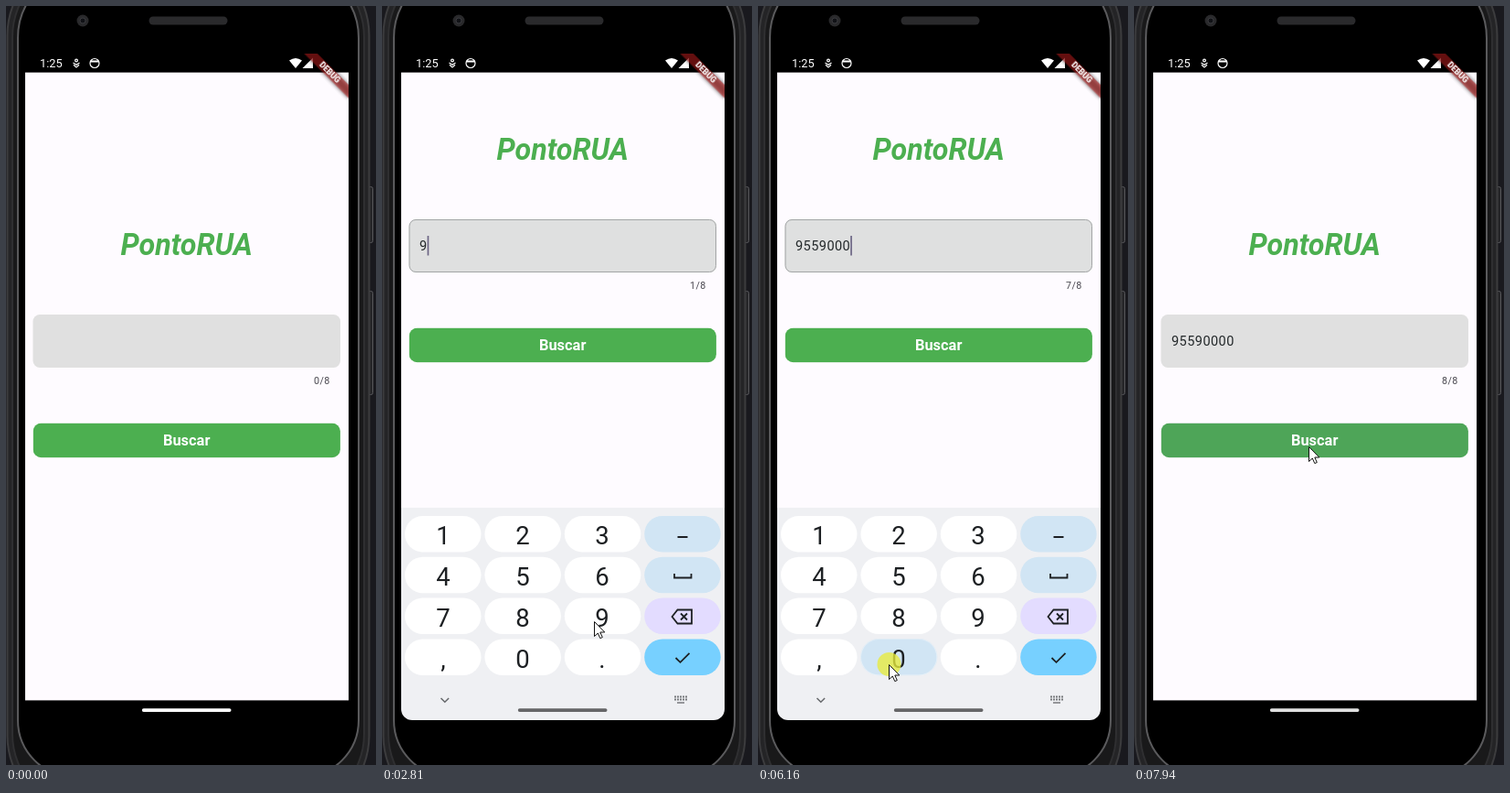
Write an HTML page that moves like this. It is 405 by 829 pixels and loops after 8000 ms.

```html
<!DOCTYPE html>
<html lang="pt">
<head>
<meta charset="utf-8">
<title>PontoRUA</title>
<style>
@property --n { syntax: "<integer>"; inherits: true; initial-value: 0; }
html, body { margin: 0; width: 100%; height: 100%; overflow: hidden; background: #19191e; }
svg { display: block; width: 405px; height: 829px; font-family: Roboto, sans-serif; }
svg, .lift, .board, .cursor, .tap, .spot, .caret, .focus, .pill, .ripple {
  animation: 8s step-end infinite;
}

/* --n counts the typed digits */
svg { animation-name: type; }
.typed { width: calc(var(--n) * 8.6px); }
.caret rect { transform: translateX(calc(var(--n) * 8.6px)); }
.wheel { transform: translateY(calc(var(--n) * -14px)); }
.lift { animation-name: lift; }
.board { animation-name: board; }
.cursor { animation-name: cursor; }
.tap { animation-name: tap; }
.spot { animation-name: spot; }
.caret { animation-name: caret; }
.focus { animation-name: focus; }
.pill { animation-name: pill; }
.ripple { animation-name: ripple; transform-origin: 192px 482px; }

@keyframes type {
  0% { --n: 0; }
  35.125% { --n: 1; }
  41.625% { --n: 2; }
  48.375% { --n: 3; }
  53.5% { --n: 4; }
  61.125% { --n: 5; }
  68.625% { --n: 6; }
  72.75% { --n: 7; }
  78%, 100% { --n: 8; }
}
@keyframes lift {
  0% { transform: translateY(0); }
  15.8% { transform: translateY(-10px); }
  16.6% { transform: translateY(-38.5px); }
  17.5% { transform: translateY(-78px); }
  18.4% { transform: translateY(-98px); }
  19.3% { transform: translateY(-104px); }
  87.1% { transform: translateY(-80px); }
  87.9% { transform: translateY(-42px); }
  88.7% { transform: translateY(-11px); }
  89.6%, 100% { transform: translateY(0); }
}
@keyframes board {
  0% { transform: translateY(232px); }
  15% { transform: translateY(205px); }
  15.8% { transform: translateY(155px); }
  16.6% { transform: translateY(98px); }
  17.5% { transform: translateY(40px); }
  18.4% { transform: translateY(10px); }
  19.3% { transform: translateY(0); }
  87.1% { transform: translateY(50px); }
  87.9% { transform: translateY(140px); }
  88.7% { transform: translateY(206px); }
  89.6%, 100% { transform: translateY(232px); }
}
@keyframes cursor {
  0% { transform: translate(321px, 900px); }
  3.25% { transform: translate(321px, 772px); animation-timing-function: steps(9); }
  11.6%, 24.5% { transform: translate(166px, 365px); animation-timing-function: steps(9, start); }
  32.4%, 35.8% { transform: translate(232px, 672px); animation-timing-function: steps(4, start); }
  39.8%, 48.7% { transform: translate(181px, 630px); animation-timing-function: steps(3, start); }
  51.7%, 54.3% { transform: translate(236px, 670px); animation-timing-function: steps(6, start); }
  60%, 79.3% { transform: translate(143px, 719px); animation-timing-function: steps(5, start); }
  83.5%, 86.3% { transform: translate(322px, 712px); animation-timing-function: steps(3); }
  88.7%, 89.6% { transform: translate(191px, 399px); animation-timing-function: steps(8, start); }
  96.6%, 100% { transform: translate(191px, 481px); }
}
@keyframes tap {
  0%, 13.375%, 35.125%, 41.625%, 48.375%, 53.5%, 62%, 69.5%, 73.6%, 78.75%, 85.7%, 99.2%, 100% { opacity: 0; }
  12.5%, 33.3%, 40%, 47.5%, 51.75%, 60.25%, 67.875%, 72%, 76.95%, 84.25%, 97.5% { opacity: 1; }
}
@keyframes spot {
  0% { transform: translate(-999px, 0); }
  30% { transform: translate(174.8px, 89.6px); }
  38% { transform: translate(87.4px, 44.8px); }
  50% { transform: translate(174.8px, 89.6px); }
  56% { transform: translate(87.4px, 134.4px); }
  82% { transform: translate(262.2px, 134.4px); }
  90%, 100% { transform: translate(-999px, 0); }
}
@keyframes caret {
  0%, 19.4%, 86.3%, 100% { opacity: 0; }
  13.375%, 24.5% { opacity: 1; }
}
@keyframes focus {
  0%, 86.3%, 100% { opacity: 0; }
  13.375% { opacity: 1; }
}
@keyframes pill {
  0% { fill: #fff; }
  21.8% { fill: #c3c3c6; }
  24.4% { fill: #656567; }
  89.6% { fill: #ccc; }
  97.5%, 100% { fill: #e0e0e0; }
}
@keyframes ripple {
  0% { transform: scale(0); }
  97.5% { transform: scale(.2); }
  98.3% { transform: scale(.45); }
  99.2%, 100% { transform: scale(1); }
}
</style>
</head>
<body>
<svg viewBox="0 0 405 829">
  <defs>
    <clipPath id="screen"><path d="M21 52H375V768a12 12 0 0 1-12 12H33a12 12 0 0 1-12-12Z"/></clipPath>
    <clipPath id="typedClip"><rect class="typed" x="41" y="350" width="0" height="30"/></clipPath>
    <clipPath id="digitClip"><rect x="335" y="402" width="10" height="14"/></clipPath>
    <clipPath id="buttonClip"><rect x="29.6" y="455.6" width="336.3" height="37.6" rx="9"/></clipPath>
    <filter id="soft" x="-30%" y="-150%" width="160%" height="400%"><feGaussianBlur stdDeviation="2.2"/></filter>
    <rect id="key" x="25" y="557" width="83.5" height="39.5" rx="19.7"/>
    <g id="row">
      <use href="#key"/><use href="#key" x="87.4"/><use href="#key" x="174.8"/>
    </g>
  </defs>

  <!-- phone body -->
  <rect width="405" height="829" fill="#19191e"/>
  <g fill="#262629" stroke="#58585b">
    <rect x="396" y="197.5" width="5.5" height="61" rx="2"/>
    <rect x="396" y="311.5" width="5.5" height="113" rx="2"/>
  </g>
  <rect x="1.5" y="-58" width="396" height="945" rx="90" fill="#242426" stroke="#3c3c3e" stroke-width="2"/>
  <rect x="7" y="-50" width="385" height="929" rx="84" fill="#19191a" stroke="#2f2f31" stroke-width="2"/>
  <path d="M13 35A75 75 0 0 1 88 -40H311A75 75 0 0 1 386 35V780A62 62 0 0 1 324 842H75A62 62 0 0 1 13 780Z" stroke="#5a5a5c" stroke-width="2"/>
  <circle cx="84" cy="16" r="6.5" fill="#29292b"/>
  <circle cx="84" cy="16" r="3" fill="#111216" stroke="#3a3a3e"/>
  <rect x="156.5" y="11.5" width="86" height="9" rx="4.5" fill="#2a2a2c"/>

  <!-- status bar -->
  <text x="37" y="67.3" font-size="12.8" fill="#fff">1:25</text>
  <g fill="none" stroke="#fff" stroke-width="1.2">
    <circle cx="77" cy="59.5" r="1.4"/>
    <path d="M73.5 62l3.5 2.3 3.5-2.3M74 64.3l3 2.7 3-2.7"/>
    <circle cx="97" cy="62.5" r="5"/>
    <path d="M92.5 60.5h9" stroke-width="2"/>
  </g>
  <path d="M310 59.5Q317 54.5 324 59.5L317 68ZM336 56.5V68H324.5Z" fill="#fff"/>

  <!-- app page -->
  <rect x="21" y="72.6" width="354" height="685.8" fill="#fefbff"/>
  <g class="lift">
    <text x="197.7" y="271.7" font-size="32.3" font-weight="700" font-style="italic" text-anchor="middle" fill="#4caf50">PontoRUA</text>
    <rect x="29.5" y="337" width="336.5" height="58" rx="7.5" fill="#e0e0e0"/>
    <rect class="focus" x="30" y="337.5" width="335.5" height="57" rx="7" fill="#dfe0e0" stroke="#a2a5a5"/>
    <g clip-path="url(#typedClip)">
      <text x="41" y="371.3" font-size="14.5" letter-spacing=".45" fill="#23282a">95590000</text>
    </g>
    <g class="caret"><rect x="41" y="355" width="1.7" height="21.5" fill="#6d6685"/></g>
    <g font-size="10.7" fill="#49474f" letter-spacing=".35">
      <g clip-path="url(#digitClip)">
        <text class="wheel" y="413"><tspan x="337">0</tspan><tspan x="337" dy="14">1</tspan><tspan x="337" dy="14">2</tspan><tspan x="337" dy="14">3</tspan><tspan x="337" dy="14">4</tspan><tspan x="337" dy="14">5</tspan><tspan x="337" dy="14">6</tspan><tspan x="337" dy="14">7</tspan><tspan x="337" dy="14">8</tspan></text>
      </g>
      <text x="343.4" y="413">/8</text>
    </g>
    <g clip-path="url(#buttonClip)">
      <rect x="29" y="455" width="338" height="39" fill="#4caf50"/>
      <circle class="ripple" cx="192" cy="482" r="210" fill="#6750a4" opacity=".1"/>
    </g>
    <text x="197.7" y="479.8" font-size="16.4" font-weight="700" text-anchor="middle" fill="#fff">Buscar</text>
  </g>

  <!-- corner banner -->
  <g clip-path="url(#screen)">
    <g transform="translate(375 52) rotate(45)">
      <rect x="-34.4" y="24.1" width="68.8" height="10.3" opacity=".6" filter="url(#soft)"/>
      <rect x="-34.4" y="24.1" width="68.8" height="10.3" fill="#b71c1c" opacity=".55"/>
      <text y="32.4" font-size="8.8" font-weight="900" text-anchor="middle" fill="#fff">DEBUG</text>
    </g>
  </g>

  <!-- keyboard -->
  <g clip-path="url(#screen)">
    <g class="board">
      <rect x="21" y="548" width="354" height="234" fill="#eff0f3"/>
      <g fill="#fff">
        <use href="#row"/><use href="#row" y="44.8"/><use href="#row" y="89.6"/><use href="#row" y="134.4"/>
      </g>
      <use href="#key" x="262.2" fill="#d1e5f4"/>
      <use href="#key" x="262.2" y="44.8" fill="#d1e5f4"/>
      <use href="#key" x="262.2" y="89.6" fill="#e3dcff"/>
      <use href="#key" x="262.2" y="134.4" fill="#77d0ff"/>
      <g class="spot"><use class="tap" href="#key" fill="#d1e5f4"/></g>
      <g font-size="27.5" text-anchor="middle" fill="#1d2023">
        <text y="588"><tspan x="67">1</tspan><tspan x="154">2</tspan><tspan x="241">3</tspan></text>
        <text y="633"><tspan x="67">4</tspan><tspan x="154">5</tspan><tspan x="241">6</tspan></text>
        <text y="677.5"><tspan x="67">7</tspan><tspan x="154">8</tspan><tspan x="241">9</tspan></text>
        <text y="722.5"><tspan x="67">,</tspan><tspan x="154">0</tspan><tspan x="241">.</tspan></text>
      </g>
      <g fill="none" stroke="#1d2023" stroke-width="1.8">
        <path d="M323.5 580h11M320 620v4.5h18.5V620M321.5 712l5 4.800 10-10"/>
        <path d="M317.5 667l6-7.500h15.500v15H323.500ZM327 663.500l7 7m0-7l-7 7"/>
      </g>
      <path d="M64.5 756l4.3 4.2 4.3-4.2" fill="none" stroke="#66686b" stroke-width="1.5"/>
      <path d="M320 754.5h14M320 757.5h14" stroke="#77797c" stroke-width="1.8" stroke-dasharray="2 1"/>
      <path d="M323 761h8" stroke="#77797c" stroke-width="1.5"/>
    </g>
  </g>
  <rect class="pill" x="148.8" y="767.2" width="97.7" height="3.8" rx="1.9"/>

  <!-- pointer -->
  <g class="cursor">
    <circle class="tap" cx=".5" r="13" fill="#e8ec3c" fill-opacity=".78"/>
    <path d="M.5 .5V16.5L4.3 13 6.8 18.6 9.3 17.5 6.8 12H11.8Z" fill="#fff" stroke="#111"/>
  </g>
</svg>
</body>
</html>
```
